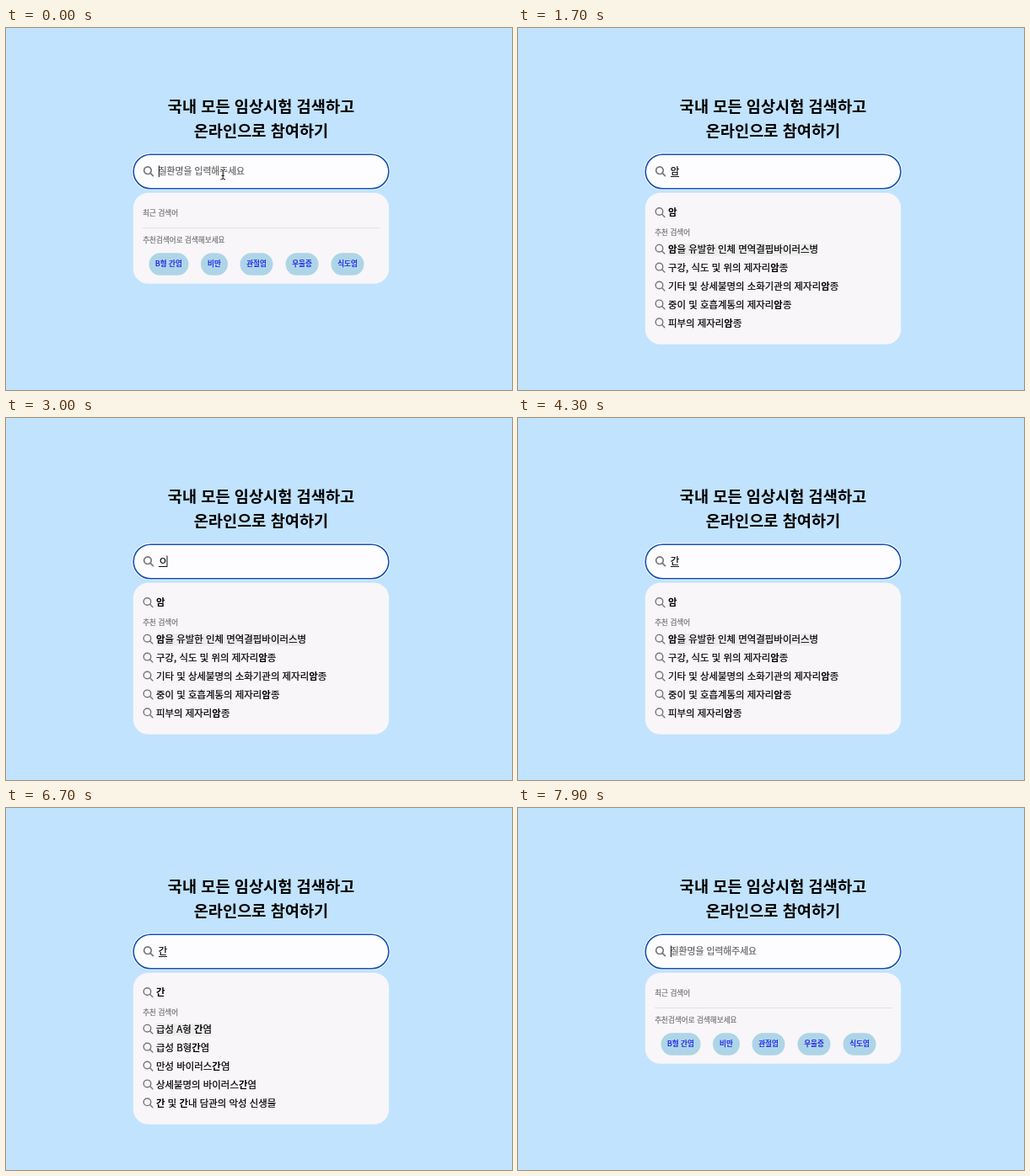
An HTML page that plays this animation: 600 by 430 pixels, repeating every 8000 ms.

```html
<!DOCTYPE html>
<html lang="ko">
<head>
<meta charset="utf-8">
<style>
html, body { margin: 0; width: 100%; height: 100%; overflow: hidden; background: #c1e3fe; }
svg { display: block; width: 600px; height: 430px; font: 500 11.44px "Noto Sans CJK KR", "Noto Sans CJK", "Noto Sans KR", sans-serif; }
text { stroke: #000; stroke-width: .22; }
.title { font-size: 18.65px; font-weight: 700; text-anchor: middle; stroke: none; }
.hint { font-size: 10.8px; fill: #666; stroke: #666; }
.small { font-size: 8.6px; fill: #777; stroke: #777; }
.chip { font-size: 8.6px; fill: #1212e8; stroke: #1212e8; text-anchor: middle; }
.lens { fill: none; stroke: #77777b; stroke-width: 1.4; stroke-linecap: round; }
.b { font-weight: 700; stroke: none; }
</style>
</head>
<body>
<svg viewBox="0 0 600 430">
  <defs>
    <g id="lens"><circle cx="-1" cy="-1" r="4.3"/><path d="M2.2 2.2 5.4 5.4"/></g>
    <path id="beam" d="M254.8 168q2.4 0 2.4 1.6v8.8q0 1.6-2.4 1.6M259.6 168q-2.4 0-2.4 1.6M257.2 178.4q0 1.6 2.4 1.6M255.8 175.3h2.8"/>
  </defs>
  <text class="title" x="302.5" y="99.5">국내 모든 임상시험 검색하고</text>
  <text class="title" x="302.5" y="129.3">온라인으로 참여하기</text>

  <rect x="151.2" y="150.2" width="302.6" height="40.6" rx="20.3" fill="none" stroke="#fbfdff" stroke-width="3.6"/>
  <rect x="151.2" y="150.2" width="302.6" height="40.6" rx="20.3" fill="#fdfcfe" stroke="#1150b8" stroke-width="1.6"/>
  <use href="#lens" x="169" y="170.2" class="lens" style="stroke-width:1.7"/>
  <text id="hint" class="hint" x="180.7" y="174">질환명을 입력해주세요</text>
  <text id="typed" x="180.8" y="174.3"></text>
  <path id="underline" d="M181 176.5h10" stroke="#111"/>
  <path id="caret" d="M0 163.5v13.5" stroke="#111"/>
  <g id="mouse" fill="none" stroke-linecap="round">
    <use href="#beam" stroke="#fff" stroke-width="2.6"/>
    <use href="#beam" stroke="#111"/>
  </g>

  <rect id="panel" x="150.8" y="195.8" width="303.4" height="108" rx="18" fill="#f8f6f9"/>
  <g id="chips">
    <text class="small" x="162.2" y="222.5">최근 검색어</text>
    <path d="M162 237.5h281.5" stroke="#e0dfe2"/>
    <text class="small" x="162.2" y="254.5">추천검색어로 검색해보세요</text>
  </g>
  <g id="list0"></g>
  <g id="list1"></g>
</svg>
<script>
const $ = id => document.getElementById(id);
const show = (id, on) => $(id).style.display = on ? '' : 'none';

const chips = [['B형 간염', 193, 47], ['비만', 247, 32], ['관절염', 297, 39], ['우울증', 351, 39], ['식도염', 405, 39]];
$('chips').innerHTML += chips.map(([name, x, w]) =>
  `<rect x="${x - w / 2}" y="267.3" width="${w}" height="26.5" rx="13.2" fill="#aed5e7"/>
   <text class="chip" x="${x}" y="283.4">${name}</text>`).join('');

const bold = (s, word) => s.replaceAll(word, `<tspan class="b">${word}</tspan>`);
const row = (s, y) => `<use href="#lens" class="lens" x="168.5" y="${y}"/><text x="178" y="${y + 4.3}">${s}</text>`;

function fillList(id, word, markWidth, items) {
  $(id).innerHTML = row(bold(word, word), 219) +
    '<text class="small" x="162.2" y="246">추천 검색어</text>' +
    `<rect x="178" y="256" width="${markWidth}" height="14.5" fill="#ededee"/>` +
    items.map((s, i) => row(bold(s, word), 262.7 + i * 21.9)).join('');
}
fillList('list0', '암', 177, ['암을 유발한 인체 면역결핍바이러스병', '구강, 식도 및 위의 제자리암종',
  '기타 및 상세불명의 소화기관의 제자리암종', '중이 및 호흡계통의 제자리암종', '피부의 제자리암종']);
fillList('list1', '간', 66, ['급성 A형 간염', '급성 B형간염', '만성 바이러스간염',
  '상세불명의 바이러스간염', '간 및 간내 담관의 악성 신생물']);

// [time, field content]; every entry restarts the caret blink
const keys = [[-210, ''], [590, 'ㅇ'], [690, '아'], [790, '암'], [2890, '아'], [2990, 'ㅇ'], [3090, ''],
  [3390, 'ㄱ'], [3590, '가'], [3790, '간'], [6890, '가'], [6990, 'ㄱ'], [7190, ''], [7780, '']];
// [time, panel content]
const panels = [[0, 'chips'], [1590, 'list0'], [4590, 'list1'], [7780, 'chips']];
const current = (steps, t) => steps.findLast(s => s[0] <= t);

function draw(now) {
  const t = now % 8000;
  const [since, text] = current(keys, t);
  const panel = current(panels, t)[1];
  $('typed').textContent = text;
  show('hint', !text);
  show('underline', text);
  show('caret', (t - since) % 1000 < 500);
  $('caret').setAttribute('transform', `translate(${text ? 191 : 181.5})`);
  show('mouse', t < 590);
  for (const id of ['chips', 'list0', 'list1']) show(id, id === panel);
  $('panel').setAttribute('height', panel === 'chips' ? 108 : 180);
  requestAnimationFrame(draw);
}
draw(0);
</script>
</body>
</html>
```
